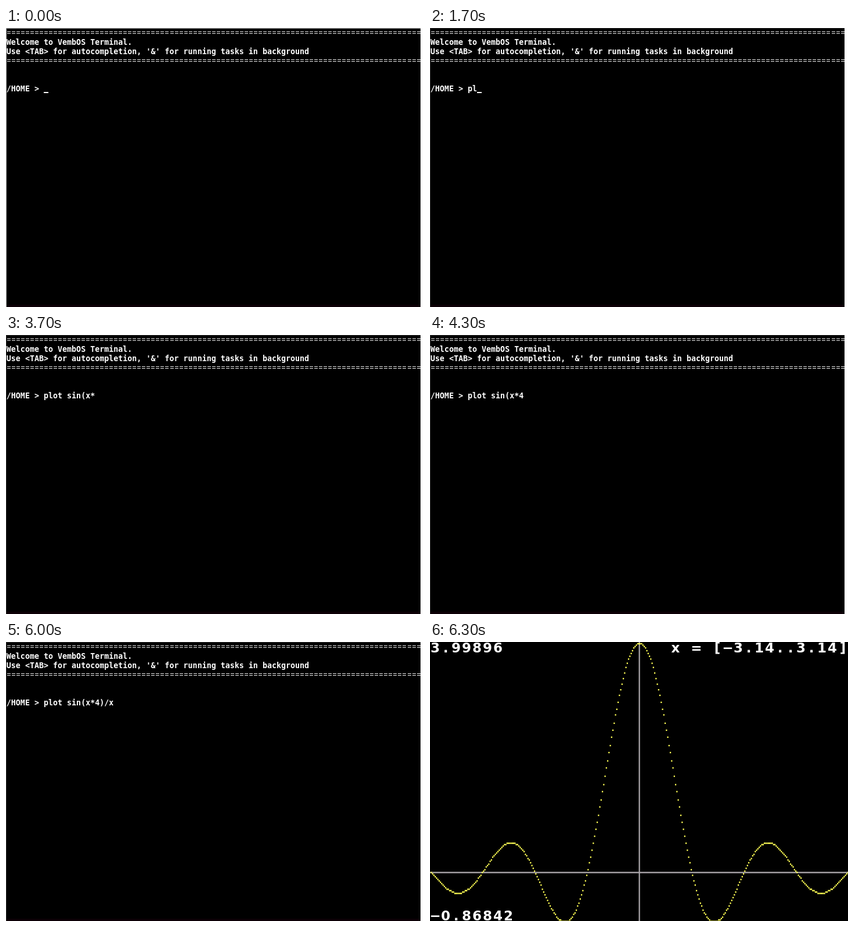
An HTML page with a canvas that plays this animation: 720 px wide and 480 px high, repeating every 8000 ms.

```html
<!DOCTYPE html>
<html lang="en">
<head>
<meta charset="utf-8">
<title>Terminal plot</title>
<style>
  html, body { margin: 0; width: 100%; height: 100%; overflow: hidden; background: #000; }
  canvas { display: block; }
</style>
</head>
<body>
<canvas id="stage" width="720" height="480"></canvas>
<script>
const ctx = document.getElementById('stage').getContext('2d');
const LOOP = 8000, FOCUS = 500, ENTER = 5900, MODE_SWITCH = 6200, PLOT = 6300;

const RULE = '='.repeat(89);
const HEADER = [
  RULE,
  'Welcome to VembOS Terminal.',
  "Use <TAB> for autocompletion, '&' for running tasks in background",
  RULE
];
const PROMPT = '/HOME > ', COMMAND = 'plot sin(x*4)/x', PROMPT_ROW = 6;
const CELL = 8.02, LEFT = 0.8, WINDOW_RIGHT = 714;

// One time per typed character, and the times the cursor toggles (it starts lit).
const KEYS = [1300, 1700, 1900, 2000, 2300, 2300, 2500, 2500, 2900, 3200,
  3700, 4100, 4500, 4900, 5100];
const BLINKS = [300, 600, 900, 1200, 1500, 1700, 2000, 2300, 2500, 2800, 3100,
  3400, 3700, 3900, 4300, 4500, 4800, 5100, 5400, 5700, 6000];

const passed = (times, t) => times.filter(at => at <= t).length;

function rect(color, x, y, w, h) {
  ctx.fillStyle = color;
  ctx.fillRect(x, y, w, h);
}

// Writes each character in the middle of its own cell.
function cells(str, x, baseline, pitch, font) {
  ctx.font = font;
  ctx.textAlign = 'center';
  ctx.fillStyle = '#fff';
  [...str].forEach((ch, i) => ctx.fillText(ch, x + (i + 0.5) * pitch, baseline));
}

const cellX = col => Math.round(LEFT + col * CELL);

function terminalRow(str, row) {
  const top = 1 + row * 16;
  if (str !== RULE) {
    cells(str, LEFT, top + 12, CELL, 'bold 13.3px "DejaVu Sans Mono", monospace');
    return;
  }
  for (let i = 0; i < str.length; i++) {
    rect('#f0f0f0', cellX(i) + 1, top + 5, 6, 1);
    rect('#f0f0f0', cellX(i) + 1, top + 8, 6, 1);
  }
}

function drawTerminal(t) {
  const border = t < FOCUS ? '#b4b4b4' : '#2c2c2c';
  rect('#0c0006', 0, 476, 720, 4);
  rect(border, 0, 0, 1, 480);
  rect(border, 0, 0, WINDOW_RIGHT, 1);
  rect('#fff', WINDOW_RIGHT, 0, 720 - WINDOW_RIGHT, 480);
  HEADER.forEach(terminalRow);
  const line = PROMPT + COMMAND.slice(0, passed(KEYS, t));
  terminalRow(line, PROMPT_ROW);
  if (passed(BLINKS, t) % 2 === 0) {
    const entered = t >= ENTER;
    const col = entered ? 0 : line.length, row = PROMPT_ROW + (entered ? 1 : 0);
    rect('#fff', cellX(col), row * 16 + 14, 8, 2);
  }
}

// Hue section of the 256-colour palette: 24 steps around the wheel at three saturations.
function hueColor(index) {
  const n = index - 32, level = [255, 113, 65][Math.floor(n / 72)];
  const low = level * [0, 0.49, 0.71][Math.floor(n % 72 / 24)];
  const ramp = shift => {
    const d = Math.abs(((n % 24 - shift + 36) % 24) - 12);
    return Math.round(low + (level - low) * Math.min(1, Math.max(0, (8 - d) / 4)));
  };
  return `rgb(${ramp(8)},${ramp(16)},${ramp(0)})`;
}

function seeded(seed) {
  return () => (seed = (seed * 16807) % 2147483647) / 2147483647;
}

// Text memory seen through the graphics mode: four interleaved planes, 80 bytes per row.
const PW = 2.25, PH = 2.4, GROUP = 9.02;
function planePixel(color, address, plane) {
  const col = address % 80, row = Math.floor(address / 80);
  rect(color, 1 + col * GROUP + plane * PW, 1 + row * PH, PW, PH);
}

// Rows lit in each block of eight columns.
const BAND = [[74, 80, 86], [74, 84, 86], [75, 83], [73, 81], [74, 82, 84],
  [74, 80, 82], [75, 79, 81], [79, 81, 85], [72, 80], [72, 74]];

function drawModeSwitch() {
  for (let col = 0; col < 80; col++) {
    const x = 1 + col * GROUP;
    rect('#700c14', x, 81, PW, 399);
    rect('#a4aaaa', x + PW, 0, PW, 480);
  }

  const screen = Array(2700).fill(' ');
  const put = (str, row) => [...str].forEach((ch, i) => { screen[row * 90 + i] = ch; });
  HEADER.forEach(put);
  put(PROMPT + COMMAND, PROMPT_ROW);
  screen.forEach((ch, i) => {
    planePixel(ch === ' ' ? '#34288c' : hueColor(ch.charCodeAt(0)), i, 0);
    planePixel('#a09cf0', i, 1);
  });

  const random = seeded(417);
  const tints = ['#24484a', '#24484a', '#24484a', '#8a3048', '#a04858', '#34606a'];
  for (let glyph = 0; glyph < 256; glyph++) {
    const filled = random() < 0.55;
    let tint = tints[0];
    for (let row = 2; row < 12; row++) {
      if (random() < 0.4) tint = tints[Math.floor(random() * tints.length)];
      const spark = random() < 0.04;
      if (filled && random() < 0.6) planePixel(spark ? '#e0e050' : tint, glyph * 32 + row, 2);
    }
  }
  BAND.forEach((rows, block) => {
    for (let i = 0; i < 8; i++) {
      const col = block * 8 + i;
      rows.forEach(row => planePixel('#ffff3c', row * 80 + col, 2));
      if (block > 7) planePixel('#b4b4ec', 88 * 80 + col, 2);
    }
  });
}

function drawPlot() {
  const max = 3.99896, min = -0.86842, left = 1.2, top = 1.8;
  const rowOf = v => Math.min(199, Math.max(0, Math.floor(200 * (max - v) / (max - min))));
  rect('#aaa5aa', 359.5, 0, PW, 480);
  rect('#aaa5aa', 0, top + rowOf(0) * PH, 720, PH);
  for (let i = 0; i < 320; i++) {
    const x = ((i + 0.5) / 320 * 2 - 1) * Math.PI;
    rect('#ffff55', left + i * PW, top + rowOf(Math.sin(4 * x) / x) * PH, PW, PH);
  }
  const label = (str, x, y) => cells(str, x, y, 18, 'bold 23px "DejaVu Sans", sans-serif');
  label('3.99896', 0, 18);
  label('x = [\u22123.14..3.14]', 414, 18);
  label('\u22120.86842', 0, 479);
}

let start;
function frame(now) {
  start ??= now;
  const t = (now - start) % LOOP;
  rect('#000', 0, 0, 720, 480);
  if (t < MODE_SWITCH) drawTerminal(t);
  else if (t < PLOT) drawModeSwitch();
  else drawPlot();
  requestAnimationFrame(frame);
}
requestAnimationFrame(frame);
</script>
</body>
</html>
```
